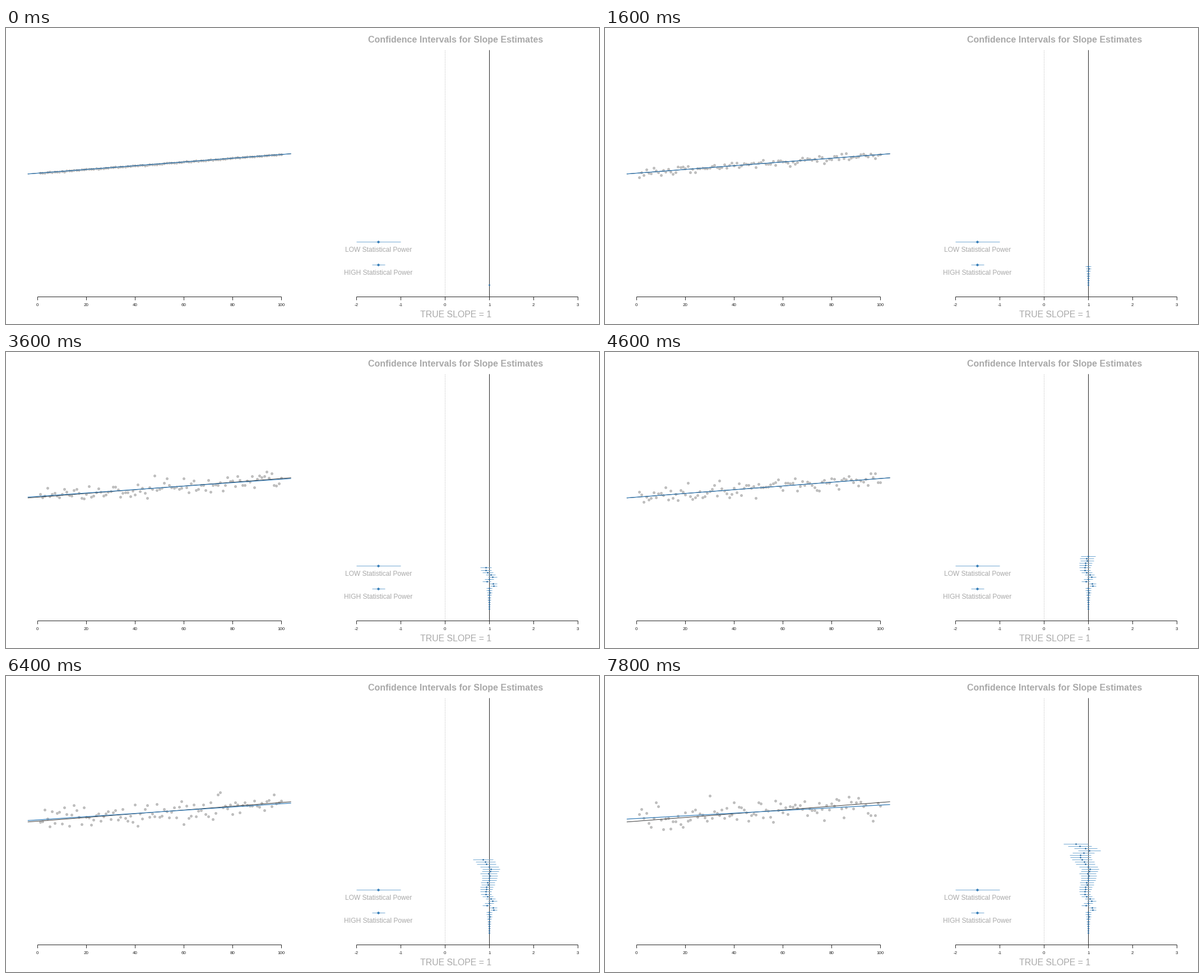
These frames come from a looping animation (1058x529 px, 8000 ms). A matplotlib script:

```python
import numpy as np
import matplotlib.pyplot as plt
from matplotlib.animation import FuncAnimation

W, H, DPI = 1058, 529, 64
PX = 72 / DPI  # points per pixel
STEPS = 40
BLUE, LIGHT, DARK = "#377eb8", "#74a9d2", "#2f6fa6"
GRAY, TEXT, INK = "#bebebe", "#a9a9a9", "#262626"

plt.rcParams["font.family"] = "Liberation Sans"
fig = plt.figure(figsize=(W / DPI, H / DPI), dpi=DPI, facecolor="white")
ax = fig.add_axes([0, 0, 1, 1])
ax.set_xlim(0, W)
ax.set_ylim(H, 0)
ax.axis("off")


def data_x(x):
    return 56.2 + 4.35 * x


def data_y(x):
    return 259.5 - 0.3345 * x


def slope_x(s):
    return 783.1 + 79.1 * s


def line(x, y, color, width=1, **kw):
    return ax.plot(x, y, color=color, lw=width * PX, solid_capstyle="butt",
                   dash_capstyle="butt", **kw)[0]


def dots(x, y, color, size):
    return ax.plot(x, y, "o", color=color, ms=size * PX, mew=0)[0]


def label(x, y, text, size, color=TEXT, **kw):
    ax.text(x, y, text, fontsize=size * PX, color=color, ha="center",
            va="baseline", **kw)


def axis(values, place):
    xs = [place(v) for v in values]
    line([xs[0], xs[-1]], [480.3, 480.3], INK, snap=True)
    for x, v in zip(xs, values):
        line([x, x], [480.3, 486], INK, snap=True)
        label(x, 497, str(v), 8, "#222222")


def key(y, half, text):
    line([slope_x(-1.5 - half), slope_x(-1.5 + half)], [y, y], LIGHT, snap=True)
    dots([slope_x(-1.5)], [y], BLUE, 4.4)
    label(664.5, y + 17.7, text, 12)


axis(range(0, 101, 20), data_x)
axis(range(-2, 4), slope_x)
label(802.3, 26, "Confidence Intervals for Slope Estimates", 16, weight="bold")
label(802.5, 517, "TRUE SLOPE = 1", 15.85)
key(382.3, 0.5, "LOW Statistical Power")
key(423.3, 0.15, "HIGH Statistical Power")
line([783.1, 783.1], [40, 480], TEXT, linestyle=(0, (1, 2)), snap=True)
line([862.2, 862.2], [39, 481], INK, snap=True)

# The noise grows by one unit per step and widens the interval with it
X = np.arange(1, 101)
ENDS = np.array([-4, 104])
SIGMA = np.arange(1, STEPS + 1)
ERROR = SIGMA / np.sqrt(np.sum((X - X.mean()) ** 2))
HALF = 1.984 * ERROR
ROWS = np.round(459 - 4.085 * np.arange(STEPS)) + 0.3

# Estimated slopes wander around 1 through a few turning points
rng = np.random.default_rng(7)
drift = np.interp(np.arange(STEPS), [0, 9, 10, 11, 12, 14, 17, 28, 34, 36, 39],
                  [0, 0, 0.09, 0.09, -0.06, 0.07, -0.07, 0.04, -0.2, 0.02, -0.28])
SLOPES = 1 + drift + 0.15 * ERROR * rng.normal(size=STEPS)


def fitted(x, step):
    return data_y(X.mean()) - 0.3345 * SLOPES[step] * (x - X.mean())


def sample(step):
    noise = np.random.default_rng(100 + step).normal(size=X.size)
    noise -= np.polyval(np.polyfit(X, noise, 1), X)
    return fitted(X, step) + 0.3345 * SIGMA[step] * noise


points = dots(data_x(X), data_y(X), GRAY, 5)
line(data_x(ENDS), data_y(ENDS), INK, 0.9)
fit = line(data_x(ENDS), data_y(ENDS), BLUE, 1.3)
bars = line([], [], LIGHT, snap=True)
centers = dots([], [], DARK, 2.8)


def draw(step):
    n = step + 1
    points.set_ydata(sample(step))
    fit.set_ydata(fitted(ENDS, step))
    s, h, rows = SLOPES[:n], HALF[:n], ROWS[:n]
    gap = np.full(n, np.nan)
    bars.set_data(np.c_[slope_x(s - h), slope_x(s + h), gap].ravel(),
                  np.c_[rows, rows, gap].ravel())
    centers.set_data(slope_x(s), rows)
    return points, fit, bars, centers


anim = FuncAnimation(fig, draw, frames=STEPS, interval=200, repeat=True,
                     init_func=lambda: draw(0))
plt.show()
```
